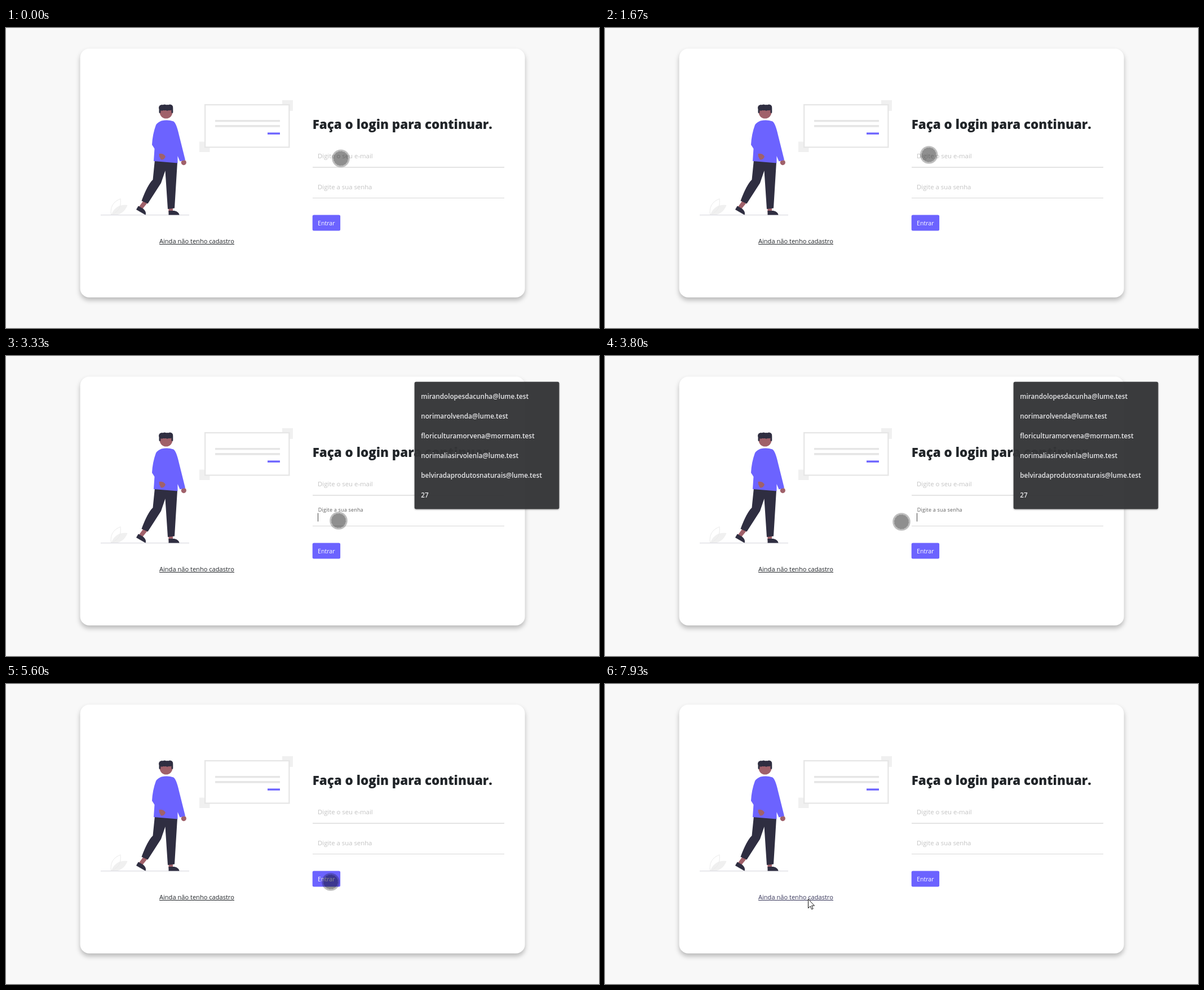
An HTML page with a canvas that plays this animation: 1052x532 px, repeating every 8 s.

```html
<!DOCTYPE html>
<html lang="pt-BR">
<head>
<meta charset="utf-8">
<title>Login</title>
<style>
html, body { margin: 0; width: 100%; height: 100%; overflow: hidden; background: #f8f8f8; }
canvas { display: block; width: 1052px; height: 532px; }
</style>
</head>
<body>
<canvas id="stage" width="1052" height="532"></canvas>
<script>
const ctx = document.getElementById('stage').getContext('2d');
const LOOP = 8000, STEP = 1000 / 15;
const FONT = '"Open Sans", "Noto Sans", sans-serif';
const PURPLE = '#6c63ff', DARK = '#2f2e41', SKIN = '#a0616a', INK = '#212529';

// Pointer glides; it rests between them
const HOME = { x: 594, y: 231 };
const MOVES = [
  { from: 0, to: 133, x: 594, y: 262 },
  { from: 333, to: 400, x: 588, y: 293 },
  { from: 600, to: 933, x: 571, y: 246 },
  { from: 933, to: 1133, x: 528, y: 243 },
  { from: 1267, to: 1800, x: 590, y: 219 },
  { from: 1933, to: 2400, x: 585, y: 327 },
  { from: 2400, to: 2800, x: 603, y: 230 },
  { from: 3000, to: 3333, x: 590, y: 292 },
  { from: 3533, to: 3800, x: 526, y: 294 },
  { from: 3800, to: 4400, x: 513, y: 318 },
  { from: 4400, to: 5133, x: 575, y: 349 },
  { from: 5533, to: 5600, x: 576, y: 351 },
  { from: 5867, to: 5933, x: 538, y: 350 },
  { from: 6000, to: 6467, x: 504, y: 361.5 },
  { from: 6733, to: 7133, x: 371, y: 388 },
  { from: 7333, to: 7733, x: 365, y: 386 }
];

// Each visit to the password field
const VISITS = [
  { open: 400, popupEnd: 1130, caretEnd: 1330, rise: 1467 },
  { open: 3267, popupEnd: 4065, caretEnd: 4465, rise: 4467 }
];
const SETTLE = 200, HOVER_AT = 7930;

const SUGGESTIONS = [
  'mirandolopesdacunha@lume.test', 'norimarolvenda@lume.test',
  'floriculturamorvena@mormam.test', 'norimaliasirvolenla@lume.test',
  'belviradaprodutosnaturais@lume.test', '27'
];

const lerp = (a, b, k) => a + (b - a) * k;
const clamp = k => Math.min(1, Math.max(0, k));

function rect(x, y, w, h, color, r = 0) {
  ctx.fillStyle = color;
  ctx.beginPath();
  ctx.roundRect(x, y, w, h, r);
  ctx.fill();
}

function disc(x, y, r, color) {
  ctx.fillStyle = color;
  ctx.beginPath();
  ctx.arc(x, y, r, 0, Math.PI * 2);
  ctx.fill();
}

function shape(d, color) {
  ctx.fillStyle = color;
  ctx.fill(new Path2D(d));
}

function text(str, x, y, size, color, weight = 400) {
  ctx.font = `${weight} ${size}px ${FONT}`;
  ctx.fillStyle = color;
  ctx.fillText(str, x, y);
}

function shadowRect(x, y, w, h, color, r, alpha, blur, dy) {
  ctx.save();
  ctx.shadowColor = `rgba(0,0,0,${alpha})`;
  ctx.shadowBlur = blur;
  ctx.shadowOffsetY = dy;
  rect(x, y, w, h, color, r);
  ctx.restore();
}

function drawCard() {
  rect(0, 0, 1052, 532, '#f8f8f8');
  shadowRect(131.6, 36.6, 789, 441.2, '#fff', 16, 0.26, 9, 5);
}

function drawBoard() {
  rect(490, 128, 19, 19, '#f0f0f0');
  rect(343, 201.5, 18.5, 18.5, '#f0f0f0');
  rect(352, 135, 151.5, 77.5, '#e6e6e6');
  rect(354.3, 137.3, 146.9, 72.9, '#fff');
  for (const y of [163, 172.1]) rect(371, y, 115, 3.6, '#e6e6e6');
  rect(464, 185.4, 22, 3.4, PURPLE);
}

function leaf(angle, length, width, paint) {
  ctx.save();
  ctx.translate(186.5, 331.5);
  ctx.rotate(angle);
  const p = new Path2D(`M0 0Q${length / 2} ${-width} ${length} 0Q${length / 2} ${width} 0 0Z`);
  paint(p);
  ctx.restore();
}

function drawPlant() {
  ctx.fillStyle = '#f0f0f0';
  ctx.strokeStyle = '#ebebeb';
  ctx.lineWidth = 1;
  leaf(-0.54, 34, 13, p => ctx.fill(p));
  leaf(-1.05, 33, 13, p => ctx.stroke(p));
  rect(168, 331, 157, 1.3, '#dcdce2');
}

function shoe(x, y, angle) {
  ctx.save();
  ctx.translate(x, y);
  ctx.rotate(angle);
  shape('M0 -7.5H10Q18 -6 19 0H0Z', DARK);
  ctx.restore();
}

function drawWalker() {
  shape('M244 306L251 310L242 321L236 317Z M288.5 318H296V327H288.5Z', SKIN);
  shoe(231, 322, 0.52);
  shoe(288.5, 331.5, 0);
  shape('M264 234L304 238L299 319.5L287 321L282.5 253L275 275L251.5 311.5L240.5 306.5' +
    'Q251 278 260.5 269Z', DARK);
  disc(315.3, 238.6, 4.6, SKIN);
  shape('M276 164.5Q287 162 297 165.5Q302 168 307 190L318 234L308.5 236.5L304.5 227V239.5' +
    'L262 236L263.5 214L259 207Q260 188 266 172Q269 167 276 164.5Z', PURPLE);
  shape('M271.5 223Q280 222 283 228Q281 234 275 233.5L272 228Z', SKIN);
  disc(284, 149, 11.5, SKIN);
  for (let i = 0; i < 4; i++) disc(276.5 + i * 4.8, 141.3 - (i % 2) * 0.5, 5.4, DARK);
  for (const x of [271.5, 293.5]) rect(x, 141, 2.8, 10, DARK, 1.4);
}

function drawForm(t) {
  text('Faça o login para continuar.', 543.7, 178.5, 22.4, INK, 800);
  text('Digite o seu e-mail', 553, 231, 11.35, '#c3c3c3');
  rect(544, 246, 340, 2, '#e4e4e4');
  rect(544, 301, 340, 1, '#d8d8d8');

  const visit = VISITS.find(v => t >= v.open && t < v.rise + SETTLE);
  const k = visit ? clamp((t - visit.rise) / SETTLE) : 1;
  const gray = Math.round(lerp(95, 195, k));
  ctx.letterSpacing = lerp(0.2, 0, k) + 'px';
  text('Digite a sua senha', lerp(553.7, 553, k), lerp(275.7, 285.7, k), lerp(9, 11.35, k),
    `rgb(${gray},${gray},${gray})`);
  ctx.letterSpacing = '0px';
  if (visit && t < visit.caretEnd) rect(553, 278.5, 1, 15, '#444');

  rect(543.7, 331.6, 49.4, 27.9, PURPLE, 2.5);
  text('Entrar', 553, 350, 10.6, '#fff', 500);

  const link = t >= HOVER_AT ? '#37365a' : INK;
  text('Ainda não tenho cadastro', 272, 382, 11.08, link);
  rect(272, 383, 133, 1, link);
}

function drawPopup() {
  shadowRect(724.7, 45.8, 256.7, 225.6, 'rgba(53,54,56,.95)', 3, 0.35, 3, 1);
  SUGGESTIONS.forEach((s, i) => text(s, 736.3, 76 + i * 35, 11.7, '#e8e8ea', 600));
}

function pointerAt(t) {
  return MOVES.reduce((p, m) => {
    const k = clamp((t - m.from) / (m.to - m.from));
    return { x: lerp(p.x, m.x, k), y: lerp(p.y, m.y, k) };
  }, HOME);
}

function drawTouch({ x, y }) {
  disc(x, y, 15.8, 'rgba(0,0,0,.25)');
  disc(x, y, 12.6, 'rgba(0,0,0,.25)');
  ctx.strokeStyle = 'rgba(0,0,0,.1)';
  ctx.lineWidth = 1.2;
  ctx.setLineDash([3, 2]);
  ctx.beginPath();
  ctx.arc(x, y, 12.8, 0, Math.PI * 2);
  ctx.stroke();
  ctx.setLineDash([]);
}

function drawArrow(x, y) {
  const arrow = new Path2D('M0 0V16L3.7 12.5L6.2 18L8.6 17L6.1 11.6H11Z');
  ctx.save();
  ctx.translate(x, y);
  ctx.fillStyle = '#fff';
  ctx.strokeStyle = '#111';
  ctx.lineWidth = 1;
  ctx.fill(arrow);
  ctx.stroke(arrow);
  ctx.restore();
}

function draw(now) {
  // The picture advances 15 times per second
  const t = Math.floor(((now % LOOP) + 4) / STEP) * STEP % LOOP + 1;
  drawCard();
  drawPlant();
  drawBoard();
  drawWalker();
  drawForm(t);
  if (VISITS.some(v => t >= v.open && t < v.popupEnd)) drawPopup();
  if (t >= HOVER_AT) drawArrow(360.5, 381.5);
  else drawTouch(pointerAt(t));
}

let start;
function tick(now) {
  start ??= now;
  draw(now - start);
  requestAnimationFrame(tick);
}
draw(0);
requestAnimationFrame(tick);
</script>
</body>
</html>
```
